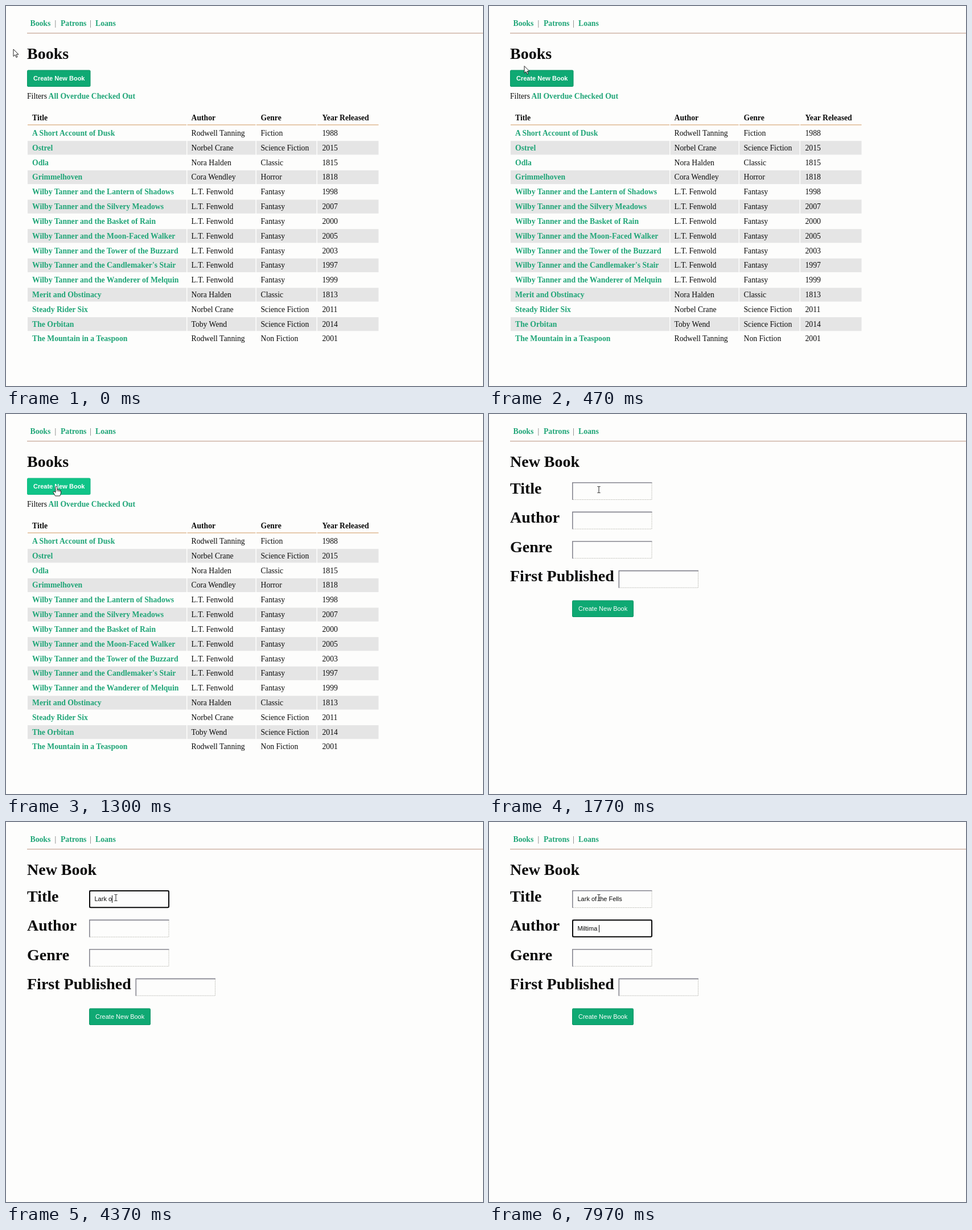
An HTML page for the animation above (8000 ms loop, 838 by 668 pixels).

```html
<!DOCTYPE html>
<html lang="en">
<head>
<meta charset="utf-8">
<title>Library catalogue</title>
<style>
  html, body { margin: 0; width: 100%; height: 100%; overflow: hidden; background: #fdfdfc; }
  svg { display: block; width: 838px; height: 668px; }
  text { font: 13.7px "Liberation Serif", serif; fill: #0b0b0b; white-space: pre; }
  .bold { font-weight: 700; }
  .link { font-weight: 700; fill: #1fa577; }
  .head { font-size: 28px; font-weight: 700; }
  .pipe { fill: #666; }
  .ui { font: 11px "Liberation Sans", sans-serif; }
  .button { font: 11px "Liberation Sans", sans-serif; fill: #fff; }
  .strong { font-weight: 700; }
</style>
</head>
<body>
<svg viewBox="0 0 838 668">
  <g id="nav"></g>
  <g id="list"></g>
  <g id="form"></g>
  <g id="cursors">
    <path id="arrow" d="M0 0V12.5L3 9.8L5 14.4L7 13.5L5 9.1H9Z" fill="#fff" stroke="#222" stroke-linejoin="round"/>
    <path id="hand" d="M-1.5 1Q0-1 1.5 1V6Q3 5 4 6.6Q5.5 5.8 6.2 7.3Q8 6.8 8 9V12L6.3 17H-2L-5.6 10.5Q-5.5 8.3-3.2 9.5L-1.5 11ZM1.5 6V9M4 6.6V9.3M6.2 7.3V9.7"
      fill="#fff" stroke="#222" stroke-linejoin="round"/>
    <path id="beam" d="M-2.5-5.5H-.7L0-5L.7-5.5H2.5M0-5V5M-2.5 5.5H-.7L0 5L.7 5.5H2.5" fill="none" stroke="#222"/>
  </g>
</svg>
<script>
const LOOP = 8000, PAGE_SWITCH = 1500, BLINK = 500;
const $ = id => document.getElementById(id);
const text = (x, y, value, style = '') => `<text x="${x}" y="${y}" class="${style}">${value}</text>`;
const rect = (x, y, w, h, fill, more = '') =>
  `<rect x="${x}" y="${y}" width="${w}" height="${h}" fill="${fill}" ${more}/>`;
const button = (x, y, w, style, id) =>
  rect(x + .5, y + .5, w - 1, 28.5, '#0fa973', `id="${id}" rx="1.5" stroke="#0b9465"`) +
  text(x + 11, y + 18, 'Create New Book', 'button ' + style);

$('nav').innerHTML =
  text(42.5, 35, 'Books', 'link') + text(85.5, 35, '|', 'pipe') +
  text(96, 35, 'Patrons', 'link') + text(147, 35, '|', 'pipe') +
  text(157, 35, 'Loans', 'link') + rect(37, 47, 801, 1.4, '#cbaea0');

const series = 'Wilby Tanner and the ';
const fantasy = (title, year) => [series + title, 'L.T. Fenwold', 'Fantasy', year];
const books = [
  ['A Short Account of Dusk', 'Rodwell Tanning', 'Fiction', 1988],
  ['Ostrel', 'Norbel Crane', 'Science Fiction', 2015],
  ['Odla', 'Nora Halden', 'Classic', 1815],
  ['Grimmelhoven', 'Cora Wendley', 'Horror', 1818],
  fantasy('Lantern of Shadows', 1998),
  fantasy('Silvery Meadows', 2007),
  fantasy('Basket of Rain', 2000),
  fantasy('Moon-Faced Walker', 2005),
  fantasy('Tower of the Buzzard', 2003),
  fantasy("Candlemaker's Stair", 1997),
  fantasy('Wanderer of Melquin', 1999),
  ['Merit and Obstinacy', 'Nora Halden', 'Classic', 1813],
  ['Steady Rider Six', 'Norbel Crane', 'Science Fiction', 2011],
  ['The Orbitan', 'Toby Wend', 'Science Fiction', 2014],
  ['The Mountain in a Teaspoon', 'Rodwell Tanning', 'Non Fiction', 2001]
];
const columns = [
  { name: 'Title', x: 46, left: 38, right: 317 },
  { name: 'Author', x: 325.5, left: 318.5, right: 438.5 },
  { name: 'Genre', x: 447.5, left: 440, right: 545.5 },
  { name: 'Year Released', x: 555.5, left: 547, right: 654.5 }
];
const table = columns.map(({ name, x, left, right }, col) =>
  text(x, 201, name, 'bold') + rect(left, 208.3, right - left, 1.3, '#dcb083') +
  books.map((book, row) => {
    const y = 228 + row * 25.82;
    const stripe = row % 2 ? rect(left, y - 16.6, right - left, 24.2, '#e5e5e5') : '';
    return stripe + text(x, y, book[col], col ? '' : 'link');
  }).join('')).join('');

$('list').innerHTML = text(37, 93, 'Books', 'head') + button(37, 112.5, 111.5, 'strong', 'create') +
  text(37, 163, 'Filters') + text(74.5, 163, 'All Overdue Checked Out', 'link') + table;

const fieldY = row => 120 + row * 51.6;
const field = (label, row) => {
  const x = label === 'First Published' ? 227.5 : 146, y = fieldY(row);
  return text(37, y + 19.5, label, 'head') +
    `<path d="M${x + .8} ${y + 31}V${y + .8}H${x + 140.5}" fill="none" stroke="#85858f" stroke-width="1.6"/>` +
    `<path d="M${x + 2} ${y + 30.5}H${x + 140}V${y + 1}" fill="none" stroke="#c3c3bd" stroke-dasharray="2 1"/>`;
};
$('form').innerHTML = text(37, 93, 'New Book', 'head') +
  ['Title', 'Author', 'Genre', 'First Published'].map(field).join('') +
  button(146, 327.5, 108, '', 'submit') +
  rect(147, 0, 139, 29.2, '#fdfdfc', 'id="focus" rx="2" stroke="#0a0a0a" stroke-width="2"') +
  text(155.5, 139, '', 'ui') + text(155.5, 190.6, '', 'ui') +
  rect(0, 0, 1, 13, '#111', 'id="caret"');

const [titleText, authorText] = $('form').querySelectorAll('.ui');
const entries = [
  { value: 'Lark of the Fells', node: titleText, start: 1950, keys: [2670, 2900, 3200, 3200, 3700, 4370,
    4470, 4570, 4800, 4930, 5070, 5430, 5430, 5570, 5700, 5800, 5970] },
  { value: 'Miltima ', node: authorText, start: 6270, keys: [6800, 7000, 7170, 7330, 7470, 7630, 7830, 7970] }
];

// time, x, y
const path = [[30, 13, 76], [470, 62, 105.5], [900, 86, 125], [1300, 88.5, 127],
  [1430, 88.5, 127], [1600, 155, 131], [1740, 193, 133]];
function pointerAt(t) {
  const next = path.findIndex(p => p[0] > t);
  if (next < 1) return (next ? path[path.length - 1] : path[0]).slice(1);
  const [t0, x0, y0] = path[next - 1], [t1, x1, y1] = path[next];
  const k = (t - t0) / (t1 - t0);
  return [x0 + (x1 - x0) * k, y0 + (y1 - y0) * k];
}

const show = (node, on) => node.setAttribute('display', on ? 'inline' : 'none');

function drawPointer(t, onForm) {
  const [x, y] = pointerAt(t);
  const hover = !onForm && x > 37 && x < 148.5 && y > 112.5 && y < 142;
  const kind = hover ? 'hand' : onForm && x > 146 ? 'beam' : 'arrow';
  for (const cursor of $('cursors').children) show(cursor, cursor.id === kind);
  $('cursors').setAttribute('transform', `translate(${x} ${y})`);
  $('create').setAttribute('fill', hover ? '#10c488' : '#0fa973');
  $('create').setAttribute('stroke', hover ? '#10b880' : '#0b9465');
}

function drawTyping(t) {
  for (const { value, node, keys } of entries)
    node.textContent = value.slice(0, keys.filter(key => key <= t).length);
  const active = entries.filter(entry => entry.start <= t).length - 1;
  show($('focus'), active >= 0);
  show($('caret'), false);
  if (active < 0) return;
  const { node, start, keys } = entries[active];
  const lastChange = Math.max(start, ...keys.filter(key => key <= t));
  const width = node.textContent ? node.getComputedTextLength() : 0;
  $('focus').setAttribute('y', fieldY(active) + 1);
  $('caret').setAttribute('x', Math.round(155.3 + width));
  $('caret').setAttribute('y', Math.round(fieldY(active) + 9));
  show($('caret'), Math.floor((t - lastChange) / BLINK) % 2 === 0);
}

const began = performance.now();
function frame() {
  const t = (performance.now() - began) % LOOP;
  const onForm = t >= PAGE_SWITCH;
  show($('list'), !onForm);
  show($('form'), onForm);
  if (onForm) drawTyping(t);
  drawPointer(t, onForm);
  requestAnimationFrame(frame);
}
frame();
</script>
</body>
</html>
```
